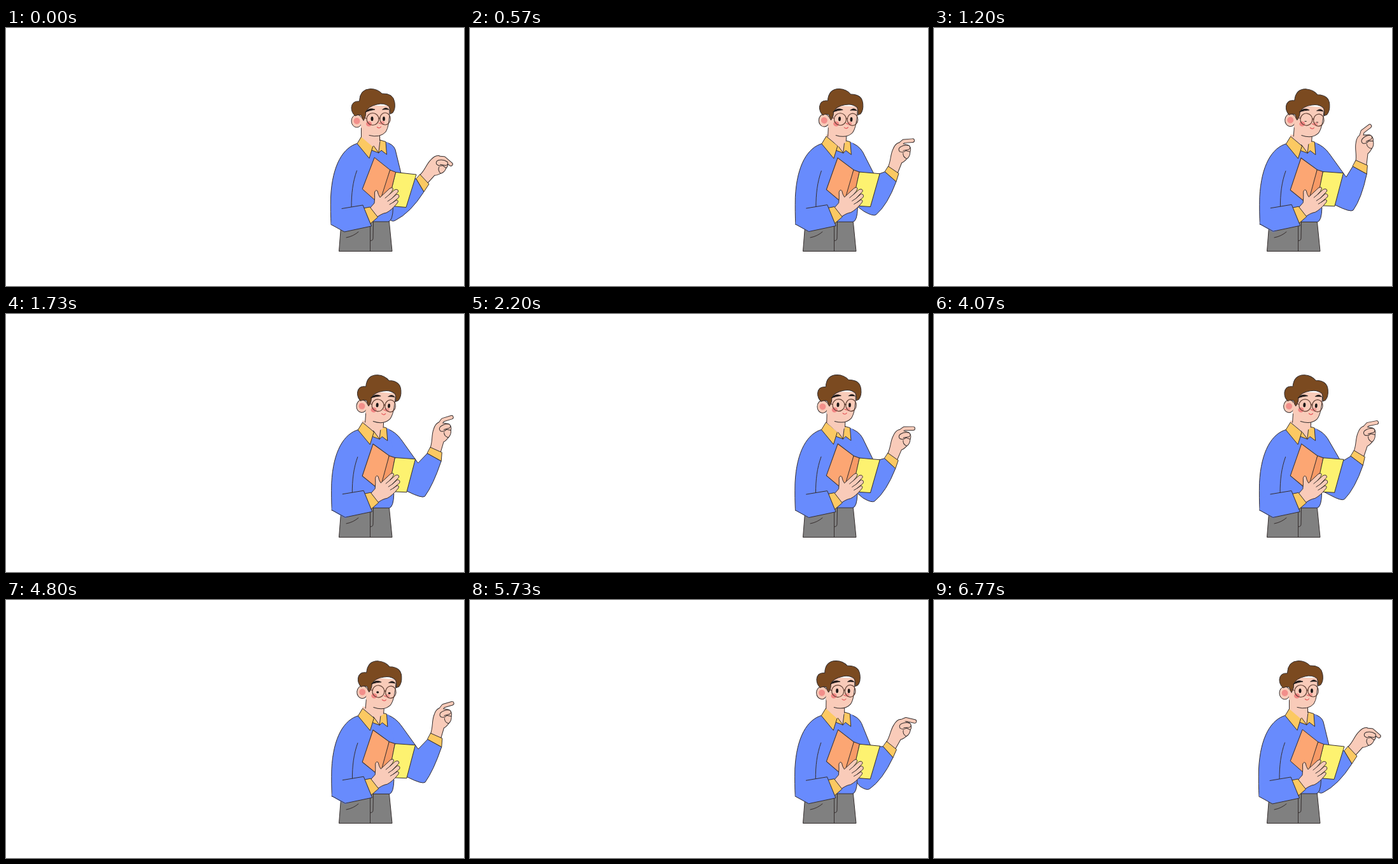
An HTML page for the animation above (6.81 s loop, 720 px wide and 405 px high).

```html
<!DOCTYPE html>
<html lang="en">
<head>
<meta charset="utf-8">
<title>Teacher with a book</title>
<style>
  html, body { margin: 0; width: 100%; height: 100%; overflow: hidden; background: #fff; }
  svg { display: block; width: 100vw; height: 100vh; }
  path, ellipse, circle { stroke: #352e2e; stroke-width: 1; stroke-linejoin: round; stroke-linecap: round; }
  .blue { fill: #688bfd; }
  .skin { fill: #f9cbb9; }
  .gold { fill: #fcc962; }
  .line { fill: none; }
  .bare { stroke: none; }
  .blush { fill: #f18583; stroke: none; }
  .lens { fill: none; stroke: #614034; stroke-width: 1.2; }
  .lip { fill: none; stroke: #e5575a; stroke-width: 1.2; }
  .dark { fill: #1c1818; stroke: none; }
</style>
</head>
<body>
<svg viewBox="0 0 720 405">
  <!-- trousers -->
  <path fill="#808080" d="M527 306L523.5 350.5H607L602 300Z"/>
  <path class="line" d="M572.5 304V350M577.5 304L577 330Q577 334 572.5 334M535 329Q546 327 554 320"/>

  <!-- pointing arm -->
  <path class="blue" id="sleeve"/>
  <g id="fist">
    <path id="fingerEdge" class="line" style="stroke-width:6.6"/>
    <path class="skin" d="M662 210C664 198 660 190 662 180Q663 171 668 168L683 167.500Q690 170 689 177Q691 184 687 189Q684 195 681 197L679 216Z"/>
    <path id="fingerFill" class="line" style="stroke:#f9cbb9;stroke-width:4.700"/>
    <path class="skin" d="M672 174Q677 168 685 168Q689 171 686 174L678 178"/>
    <path class="line" d="M673 181Q679 182 682 177L689 177M679 182Q680 188 687 189M672 174Q669 178 673 181"/>
  </g>
  <path class="gold" id="cuff"/>

  <!-- neck and sweater -->
  <g id="body">
    <path class="blue bare" d="M553 181C530 187 513 215 510.500 265Q510 290 511 308L532 320L574 304H602Q608 302 608.500 282L611 232L601 180L580 176Z"/>
    <path class="line" d="M553 181C530 187 513 215 510.500 265Q510 290 511 308M572 304H601Q608 303 608.500 282M551.500 224C545 242 543 260 543 281"/>
    <path class="skin bare" d="M558.500 167H588L589 178L586 196L566 188Z"/>
    <path class="gold" d="M576.500 183L586 196L575 192Z"/>
    <path class="gold" d="M588.500 176L597 178.500L598.500 198.500L590 192L586 196Z"/>
    <path class="gold" d="M559 170L552 181.500L571 204.500L577 185Z"/>
  </g>

  <!-- book and the arm holding it -->
  <g id="book">
    <path fill="#fca673" d="M579.500 203.500L604 223L592 275L582 272L560.500 253Z"/>
    <path fill="#f79a66" d="M604 223L613 226.500L602 275L588 273Z"/>
    <path fill="#fdf270" d="M613 226.500L645 230L629 281.500L600 279Z"/>
  </g>
  <g id="hold">
    <path class="skin" d="M570 285L579 275Q580 266 579.500 258Q581 253 584 256Q585 262 588 266L603 252Q608 249 608.500 253Q607 257 602 262L611 254Q617 252 616.500 257L606 268L614 261Q619 261 617.500 266L608 274L614 270Q618 271 615 275Q606 286 598 290Q590 291 579 300Z"/>
    <path class="line" d="M602 262L596 267M606 268L600 272M608 274L603 277"/>
    <path class="gold" d="M562 283L572 281L584.500 297L573 307Z"/>
    <path class="blue bare" d="M528 283.500L561 278L574.500 311L532 320L511 308.500L513 290Z"/>
    <path class="line" d="M528 283.500L561 278L574.500 311L532 320L511 308.500"/>
  </g>

  <!-- head -->
  <g id="head">
    <path class="skin bare" d="M558.500 150V171L576 186L588 178L587 165Z"/>
    <path class="line" d="M558.500 155V171M587.500 169V177"/>
    <ellipse class="skin" cx="551.500" cy="146" rx="8.500" ry="10"/>
    <circle class="blush" cx="551.500" cy="146" r="5" opacity=".85"/>
    <path class="skin bare" d="M562 122L558 140V156Q563 166 572 169Q588 173 597 163Q603 154 603 122Z"/>
    <path class="line" d="M571 168.500Q588 173 597 163Q603 154 603 128"/>
    <ellipse class="blush" cx="570.500" cy="150.500" rx="4.500" ry="4"/>
    <ellipse class="blush" cx="591.500" cy="149" rx="3.500" ry="3" opacity=".7"/>
    <path fill="#7b4a20" d="M562 145Q559 142 558.500 137Q553 135 549 138Q543 133 543 125Q544 114 555.500 115Q556 96 573 95.500Q584 95.500 591 103Q609 102 611 117Q612.500 127 608 133L604 135Q604 127 602 123Q594 117 583 120Q569 123 565.500 132Q566 140 562 145Z"/>
    <path class="dark" d="M565 132Q571 124 580 128Q572 129 565 132ZM592 128Q597 123 602 128Q597 127.500 592 128Z" style="stroke:#1c1818;stroke-width:.8"/>
    <ellipse class="dark eye" cx="575.500" rx="2"/>
    <ellipse class="dark eye" cx="594" rx="1.900"/>
    <circle class="lens" cx="576.500" cy="143" r="9.500"/>
    <ellipse class="lens" cx="596" cy="142.500" rx="8.300" ry="9.500"/>
    <path class="lens" d="M586 142Q587 140 588 142M567 142L560 140"/>
    <path class="lip" d="M586 149L588.500 150M583.500 155.500Q587 158.500 589.500 155"/>
  </g>
</svg>
<script>
const $ = id => document.getElementById(id);
const eyes = document.querySelectorAll('.eye');
const CYCLE = 3405;

const clamp = x => Math.min(1, Math.max(0, x));
const ease = (t, from, to) => {
  const p = clamp((t - from) / (to - from));
  return p * p * (3 - 2 * p);
};
const turn = (angle, x, y) => `rotate(${angle} ${x} ${y})`;
const shift = (x, y) => `translate(${x} ${y})`;
const place = (id, ...moves) => $(id).setAttribute('transform', moves.join(' '));

function drawArm(lift, wag) {
  // a point of the lowered arm, the same point raised, and how far the wag carries it
  const at = (x0, y0, x1, y1, k = 0) =>
    [x0 + (x1 - x0) * lift + 10 * k * wag, y0 + (y1 - y0) * lift + 3.5 * k * wag];
  const innerA = at(645, 237, 658, 217, 1), innerB = at(657, 257, 680, 229, 1);
  const outerA = at(651, 230, 663, 207.5, 1), outerB = at(665, 245, 681, 215.5, 1);

  $('sleeve').setAttribute('d',
    `M${at(596, 179, 599, 180)}Q${at(609, 182, 613, 185)} ${at(612, 191, 622, 198)}` +
    `L${at(621, 228, 648, 234)}L${innerA}L${innerB}` +
    `Q${at(636, 290, 672, 268)} ${at(612, 302, 659, 286)}` +
    `Q${at(607, 305, 655, 290)} ${at(603, 300, 631, 278)}L${at(600, 280, 605, 272)}Z`);
  $('cuff').setAttribute('d', `M${outerA}L${outerB}L${innerB}L${innerA}Z`);

  const [x, y] = at(658, 236, 671.5, 210, 1);
  place('fist', shift(x, y), turn(36 * (1 - lift) + 22 * wag, 0, 0), shift(-671, -210));
  // the index finger curls further than the hand
  for (const id of ['fingerEdge', 'fingerFill']) {
    $(id).setAttribute('d', 'M669.5 172L672 162.500L683 153.500');
    place(id, turn(44 * (1 - lift) + 26 * wag, 669.5, 171));
  }
}

function draw(t) {
  const lift = ease(t, 60, 1000) - ease(t, 1663, 2763);
  const lean = ease(t, 50, 950) - ease(t, 1530, 2630);
  const wag = t > 600 && t < 1880 ? (1 - Math.cos((t - 600) / 640 * 2 * Math.PI)) / 2 : 0;
  const open = clamp((Math.abs(t - 1220) - 60) / 250);

  drawArm(lift, wag);
  place('body', shift(1.4 * lean, 0.5 * lean));
  place('hold', shift(1.2 * lift, -0.8 * lift));
  place('book', turn(-2.5 * lift, 590, 262));
  place('head', shift(-0.3 * lean, lean), turn(4.6 * lean, 587, 257));
  for (const eye of eyes) {
    eye.setAttribute('cy', 142.5 + 3.5 * (1 - open));
    eye.setAttribute('ry', Math.max(0.5, 3.5 * open));
  }
}

const start = performance.now();
function tick() {
  draw((performance.now() - start) % CYCLE);
  requestAnimationFrame(tick);
}
tick();
</script>
</body>
</html>
```
